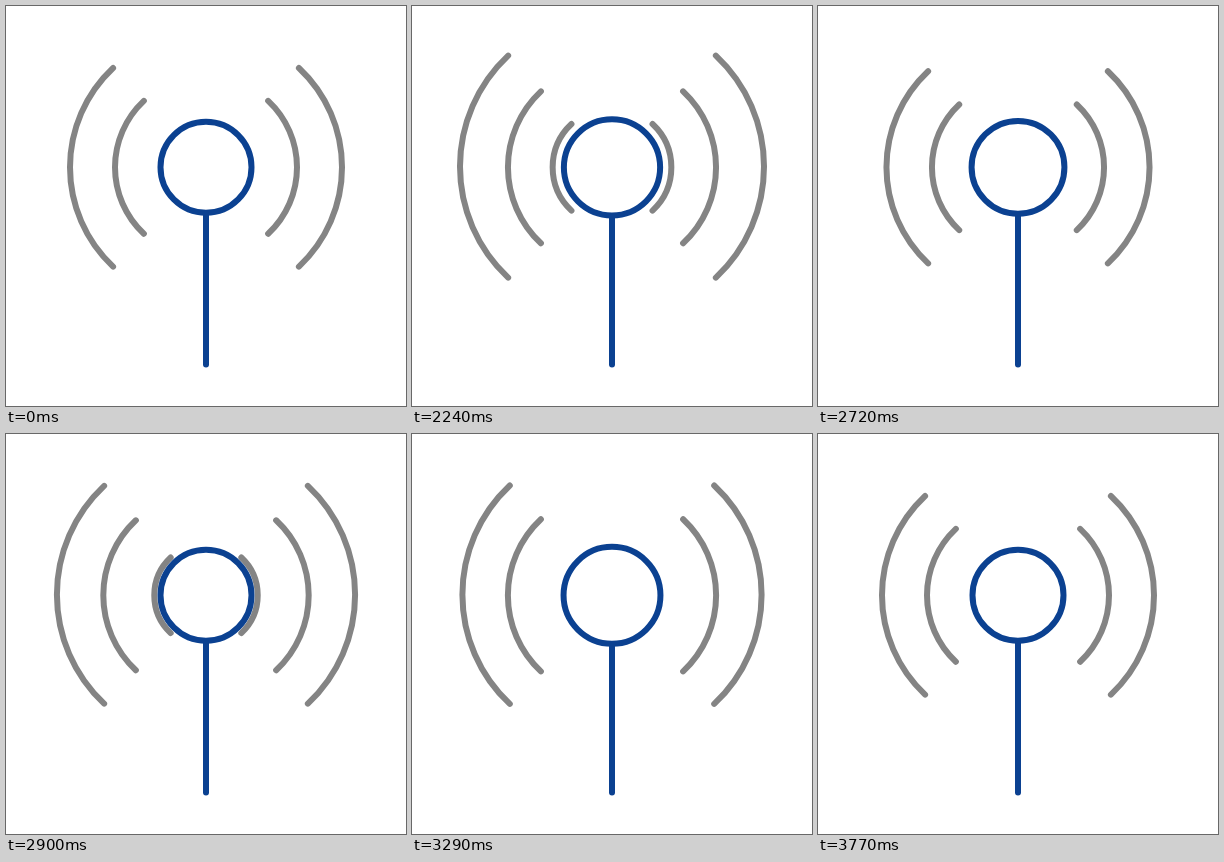
An HTML page without scripts that plays this animation: 400x400 px, repeating every 5030 ms.

```html
<!DOCTYPE html>
<html lang="en">
<head>
<meta charset="utf-8">
<title>Antenna signal</title>
<style>
  html, body { margin: 0; width: 100%; height: 100%; overflow: hidden; background: #fff; }
  svg { display: block; width: 100%; height: 100%; }
  circle, line { fill: none; stroke-width: 6; stroke-linecap: round; }

  /* Each wave is one circle dashed into a left and a right arc. */
  .wave {
    cx: 200px; cy: 161.3px; r: 44px;
    stroke: #848484;
    stroke-dasharray: 93.8 86.2;
    stroke-dashoffset: 46.9;
  }
  .mast { stroke: #0b4191; }
  .head { cx: 200px; cy: 161.3px; r: 45.5px; fill: #fff; }

  .wave, .head { animation: 5030ms linear infinite; }
  .outer { animation-name: outer; }
  .inner { animation-name: inner; }
  .extra { animation-name: extra; }
  .head { animation-name: pulse; }

  /* Waves leave the stage, then start again hidden behind the head. */
  @keyframes outer {
    0%, 39.96% { r: 136px; cy: 161.3px; }
    40.36% { r: 137.2px; }
    48.71% { r: 166.7px; cy: 160px; }
    50.5% { r: 177px; }
    51.67% { r: 182px; cy: 159.5px; }
    51.68%, 56.46% { r: 44px; cy: 161.3px; }
    60.64% { r: 70.6px; }
    65.41% { r: 104px; animation-timing-function: cubic-bezier(.33, .43, .67, 1); }
    71.77%, 100% { r: 136px; cy: 161.3px; }
  }
  @keyframes inner {
    0%, 39.96% { r: 91px; }
    40.36% { r: 92px; }
    48.71% { r: 116px; }
    54.08% { r: 131.5px; }
    55.47% { r: 136px; cy: 161.3px; }
    60.64% { r: 166.7px; cy: 160px; }
    62.41% { r: 178px; cy: 159.6px; }
    62.42%, 65.41% { r: 44px; cy: 161.3px; animation-timing-function: cubic-bezier(.33, .43, .67, 1); }
    74.95%, 100% { r: 91px; cy: 161.3px; }
  }
  @keyframes extra {
    0%, 39.76% { r: 44px; }
    40.36% { r: 47.6px; }
    48.71% { r: 71px; }
    54.08% { r: 86px; }
    55.67% { r: 91px; }
    60.64% { r: 120px; }
    63.3% { r: 136px; cy: 161.3px; }
    65.41% { r: 149.5px; cy: 160.7px; }
    70.17% { r: 175px; cy: 159.7px; }
    70.18%, 100% { r: 44px; cy: 161.3px; }
  }
  @keyframes pulse {
    0%, 39.76% { r: 45.5px; }
    47.6% { r: 49.8px; }
    55.86%, 59.64% { r: 45.5px; }
    67.3% { r: 49.4px; }
    74.95%, 100% { r: 45.5px; }
  }
</style>
</head>
<body>
<svg viewBox="0 0 400 400">
  <circle class="wave outer" pathLength="360"/>
  <circle class="wave inner" pathLength="360"/>
  <circle class="wave extra" pathLength="360"/>
  <line class="mast" x1="200" y1="207" x2="200" y2="358.5"/>
  <circle class="mast head"/>
</svg>
</body>
</html>
```
